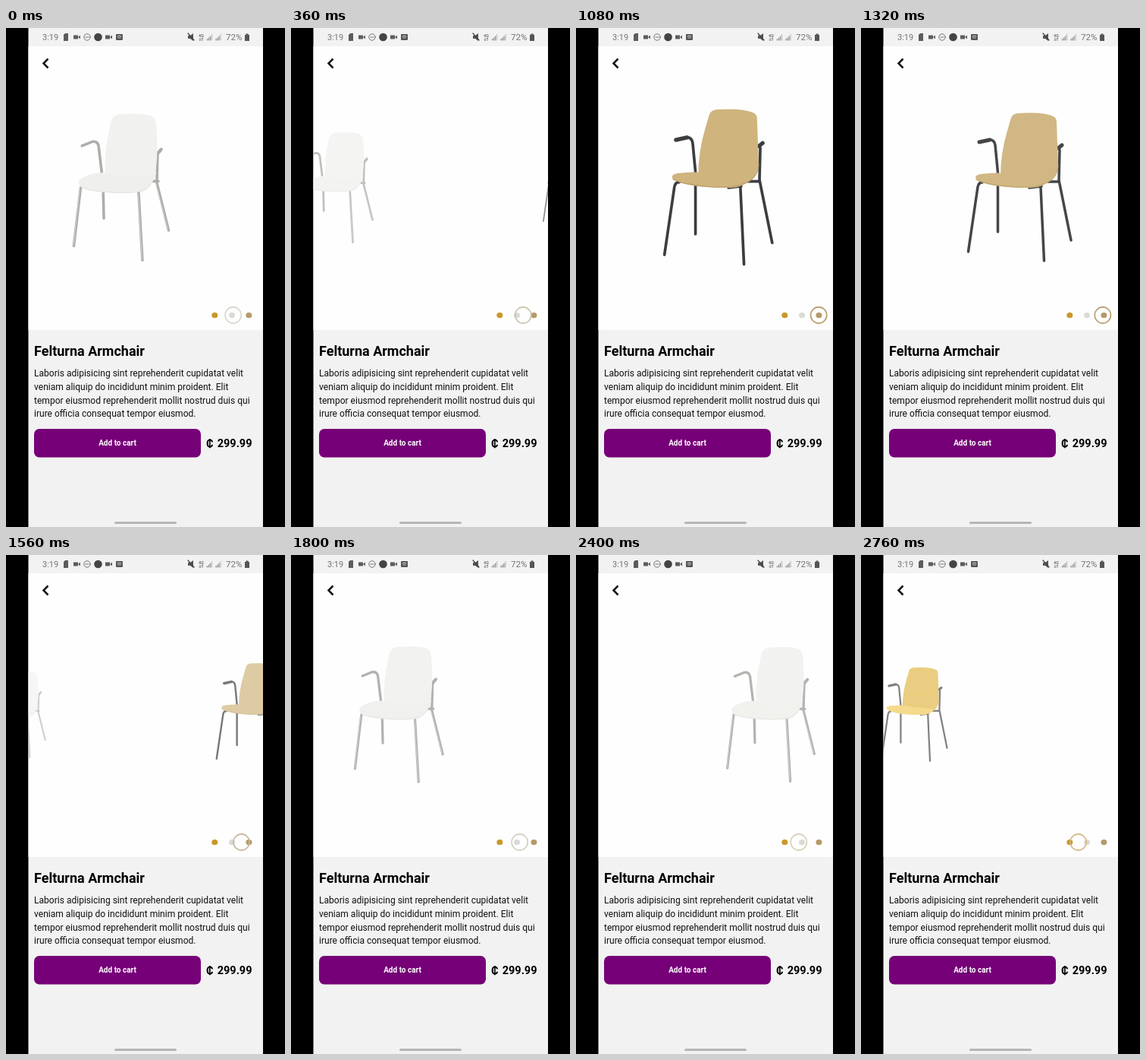
An HTML page for the animation above (2.88 s loop, 368 by 656 pixels).

```html
<!DOCTYPE html>
<html lang="en">
<head>
<meta charset="utf-8">
<title>Armchair carousel</title>
<style>
  html, body { margin: 0; height: 100%; overflow: hidden; background: #000; }
  svg { display: block; font-family: Roboto, sans-serif; }
  .line { fill: none; stroke-linecap: round; stroke-linejoin: round; }
  .bold { font-weight: 700; }
</style>
</head>
<body>
<svg width="368" height="656" viewBox="0 0 368 656">
  <defs>
    <g id="shell">
      <path d="M184 194Q184 165 193 135L198 118Q200 113 207 112Q243 110 255 117Q258 119 258 124L260 180Q260 191 251 200Q241 208 226 209Q203 209 186 198Z"/>
      <path d="M151 197Q151 193 158 192Q180 189 196 192L250 198Q243 209 225 210Q185 210 166 205Q152 201 151 197Z"/>
    </g>
    <g id="frame" class="line" stroke="#3c3d3f" stroke-width="3.5">
      <path d="M180.500 204V268M261 200L277 279M261 200L262 160M246 202H261M222 210L238 208"/>
      <path d="M160 203Q155 203 154 209L141.500 294M237 209L241.500 306"/>
      <path d="M170 147Q176 147 177 154L180.500 190"/>
      <path d="M156 150L170 147M260 158L265 154" stroke-width="5"/>
    </g>
  </defs>

  <rect x="29.500" width="309.500" height="656" fill="#f2f2f2"/>
  <rect x="29.500" y="24" width="309.500" height="373" fill="#fefefe"/>

  <g id="status" fill="#747474" font-size="11.500">
    <text x="48" y="16" font-size="11">3:19</text>
    <path d="M76 9l2-2h4v10h-6zM89 9.500h6v5h-6zM95 12l3-2.500v5zM131 9.500h6v5h-6zM137 12l3-2.500v5z" fill="#5c5c5c"/>
    <g class="line" stroke="#747474"><circle cx="107" cy="12" r="4.200"/><path d="M105 12h4"/></g>
    <circle cx="121.500" cy="12" r="5.300" fill="#444"/>
    <rect x="145" y="8" width="9" height="8" rx="1" fill="#555"/>
    <path class="line" d="M147 11q2.500-2 5 0M148 13q1.500-1 3 0" stroke="#eee" stroke-width=".9"/>
    <path d="M240 10h3l4-3v10l-4-3h-3z" fill="#555"/>
    <path class="line" d="M240 7l8 9" stroke="#444" stroke-width="1.300"/>
    <text x="254" y="11.500" font-size="5.500" class="bold">4G</text>
    <path class="line" d="M256 13v3.500m-1-1l1 1 1-1M259 16.500V13m-1 1l1-1 1 1" stroke="#747474" stroke-width=".8"/>
    <path class="line" d="M265.500 16v-1.500M267.500 16v-3M269.500 16v-5M277 16v-1.500M279 16v-3M281 16v-5" stroke="#888" stroke-width="1.200"/>
    <path class="line" d="M271.500 16V8.500M283 16V8.500" stroke="#bbb" stroke-width="1.200"/>
    <text x="290" y="16">72%</text>
    <path d="M315 9h1.500V7.500h3V9H321v8h-6z" fill="#555"/>
  </g>

  <svg x="29.500" y="24" width="309.500" height="373" viewBox="29.500 24 309.500 373">
    <g class="chair">
      <g transform="scale(1.055) translate(-205.700 -210)">
        <use href="#frame"/><use href="#shell" fill="#dfb33c"/>
        <path d="M151 197Q151 193 158 192Q180 189 200 193L250 199Q243 209 225 210Q185 210 166 205Q152 201 151 197Z" fill="#f0c74f"/>
        <path class="line" d="M203 166Q222 169 243 165" stroke="#edb52a" stroke-width="2"/>
      </g>
    </g>
    <g class="chair">
      <g transform="translate(-184 -210)">
        <g class="line" stroke="#a8a8a5" stroke-width="3.800">
          <path d="M164 212L165 253M239 200L256.500 270M240 199L241 161M230 201H242"/>
          <path d="M137 207Q133 206 132 212L122.500 292M214 215L219.500 312"/>
          <path d="M134 151L149 145Q156 144 157.500 151L162 188"/>
          <path d="M240 163L246 156" stroke-width="4.800"/>
          <path d="M131 212L122 291M213.500 219L219 311M238.500 204L255.500 269" stroke="#d2d2cf" stroke-width="1"/>
        </g>
        <path d="M167 190Q165 160 174 121Q176 108 186 107Q219 104 232 109Q238 112 239 121Q242 165 238 186Q236 201 224 207L180 206Z" fill="#f1f2ee"/>
        <path d="M129 203Q129 196 147 191Q164 186 176 192Q200 199 236 191Q235 209 219 216Q185 220 145 214Q130 210 129 203Z" fill="#eff0ec"/>
        <path class="line" d="M132 209Q145 215 185 217Q213 218 224 212Q235 205 239 188" stroke="#dfe0dc"/>
      </g>
    </g>
    <g class="chair">
      <g transform="scale(1.055) translate(-205.700 -210)">
        <use href="#frame"/><use href="#shell" fill="#cfb47d"/>
        <path class="line" d="M152 199Q164 206 201 209Q240 211 253 198Q260 191 260 180" stroke="#b99d65"/>
      </g>
    </g>
  </svg>

  <path class="line" d="M55.500 40.500L49.500 46.500L55.500 52.500" stroke="#111" stroke-width="2.500" style="stroke-linecap:butt;stroke-linejoin:miter"/>
  <ellipse cx="275.300" cy="377.700" rx="4" ry="3.600" fill="#c9982a"/>
  <ellipse cx="298" cy="377.700" rx="4" ry="3.600" fill="#dadad6"/>
  <ellipse cx="320.400" cy="377.700" rx="4" ry="3.600" fill="#b59a68"/>
  <circle id="ring" cy="377.500" r="10.600" fill="none" stroke-width="1.600"/>

  <text x="37" y="431" font-size="18" class="bold">Felturna Armchair</text>
  <g font-size="12.050" fill="#111">
    <text x="37" y="458">Laboris adipisicing sint reprehenderit cupidatat velit</text>
    <text x="37" y="476">veniam aliquip do incididunt minim proident. Elit</text>
    <text x="37" y="493.500">tempor eiusmod reprehenderit mollit nostrud duis qui</text>
    <text x="37" y="511">irure officia consequat tempor eiusmod.</text>
  </g>
  <rect x="37" y="527" width="220" height="37.500" rx="7" fill="#750077"/>
  <text x="147" y="549.200" font-size="10" class="bold" fill="#fff" text-anchor="middle">Add to cart</text>
  <g font-size="14.500" class="bold">
    <text x="264" y="551">₵</text>
    <text x="324.500" y="551" text-anchor="end">299.99</text>
  </g>
  <rect x="143" y="649" width="82" height="3" rx="1.500" fill="#b6b6b6"/>
</svg>
<script>
const LOOP = 2880, STEP = 120, PAGE = 310;
const chairs = document.querySelectorAll('.chair');
const ring = document.getElementById('ring');
const colors = [[201, 152, 42], [218, 218, 214], [181, 154, 104]];

// time, scroll position, and the effect position that trails behind it
const keys = [
  [0, 1.12, 1.083], [360, 1.411, 1.373], [480, 1.68, 1.54], [600, 1.89, 1.68],
  [720, 1.97, 1.8], [840, 1.995, 1.93], [960, 2, 1.985], [1200, 2, 2],
  [1320, 1.93, 1.935], [1560, 1.555, 1.565], [1800, 1.15, 1.17], [1920, 1.05, 1.06],
  [2160, 1, 1], [2280, .94, .95], [2400, .78, .82], [2760, .373, .5]
];

const mix = (a, b, k) => a + (b - a) * k;

function positionsAt(t) {
  const i = keys.findIndex(key => key[0] > t);
  if (i < 0) return keys[keys.length - 1].slice(1);
  const a = keys[i - 1], b = keys[i], k = (t - a[0]) / (b[0] - a[0]);
  return [mix(a[1], b[1], k), mix(a[2], b[2], k)];
}

function draw() {
  const t = Math.floor(performance.now() % LOOP / STEP) * STEP;
  const [scroll, effect] = positionsAt(t);
  chairs.forEach((chair, i) => {
    const away = Math.abs(i - effect);
    const scale = Math.max(0, 1 - .8 * away);
    chair.setAttribute('transform', `translate(${184 + (i - scroll) * PAGE} 210) scale(${scale})`);
    chair.setAttribute('opacity', Math.max(0, 1 - .7 * away));
  });
  const from = Math.min(1, Math.floor(effect));
  const rgb = colors[from].map((c, j) => Math.round(mix(c, colors[from + 1][j], effect - from)));
  ring.setAttribute('cx', 275.3 + 22.5 * effect);
  ring.setAttribute('stroke', `rgb(${rgb})`);
  requestAnimationFrame(draw);
}
draw();
</script>
</body>
</html>
```
